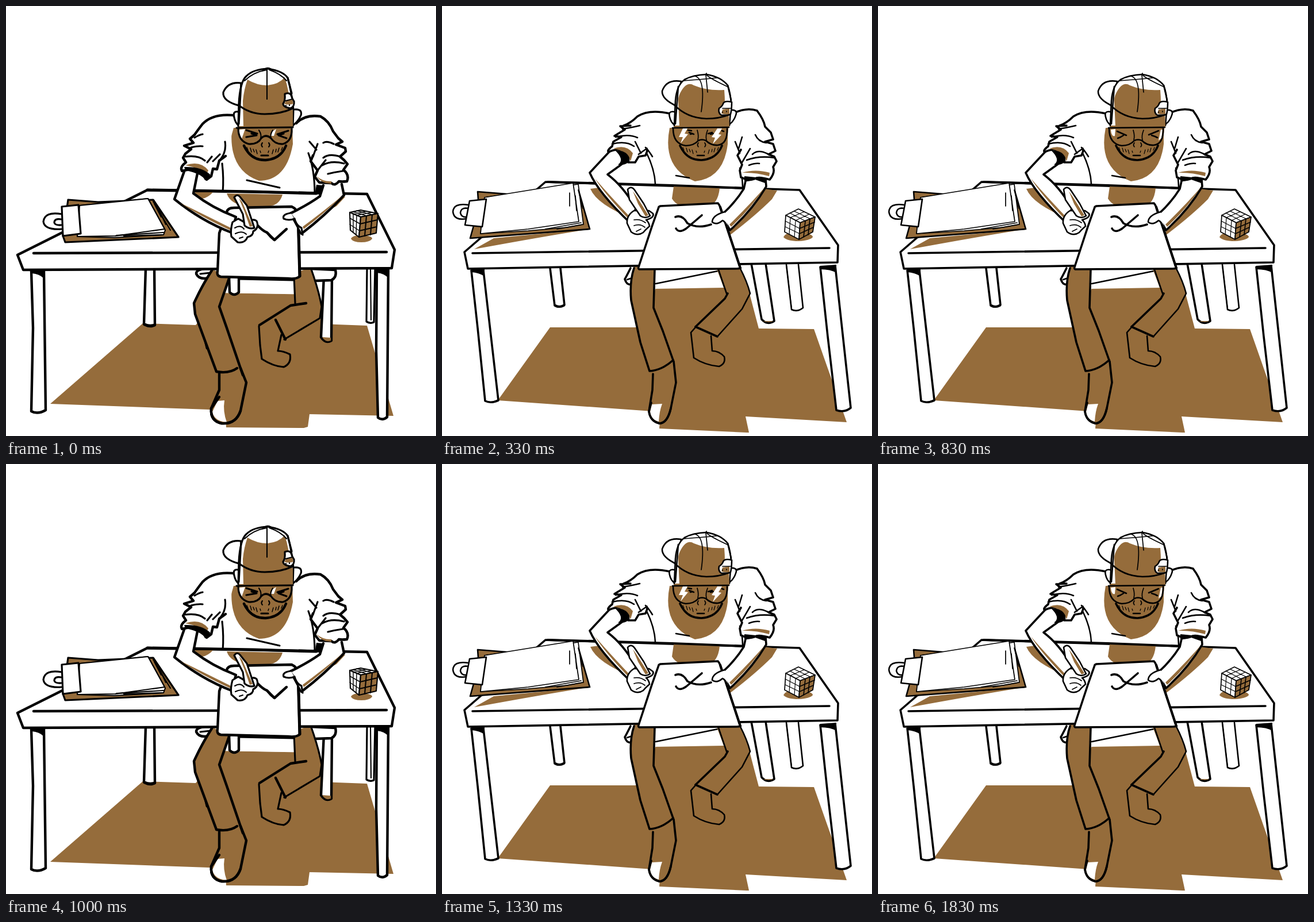
An HTML page that plays this animation: 748 by 748 pixels, repeating every 2010 ms.

```html
<!DOCTYPE html>
<html lang="en">
<head>
<meta charset="utf-8">
<title>Writing at the desk</title>
<style>
html, body { margin: 0; width: 100%; height: 100%; overflow: hidden; background: #fff; }
svg { display: block; width: 100%; height: 100%; --pen: 4.4px; stroke: #000; stroke-width: var(--pen); stroke-linecap: round; stroke-linejoin: round; }
path { fill: none; }
.w { fill: #fff; }
.b { fill: #956c3b; stroke: none; }
.o { fill: #956c3b; }
.e { fill: #fff; stroke: none; }
.k { fill: #000; stroke: none; }
.f { stroke-width: calc(var(--pen) * .33); }
.t { stroke-width: calc(var(--pen) * .48); }
.m { stroke-width: calc(var(--pen) * .72); }
.h { stroke-width: calc(var(--pen) * 1.15); }
.glare .squint, .shut .shine { display: none; }
</style>
</head>
<body>
<!-- d is the upright pose, data-to the leaning pose; both share one command structure -->
<svg id="scene" class="shut" viewBox="0 0 748 748">
<g id="floor">
<path class="b" d="M77 692L238 552L330 555L375 499L545 502L548 553L628 556L674 713L528 710L525 732L518 734L383 733L381 703Z" data-to="M97 686L188 559L340 559L372 491L532 489L551 561L647 562L704 724L528 714L534 742L530 742L378 735L380 706Z"/>
<path class="w" d="M243 456L240 553Q250 560 259 555L258 456" data-to="M188 456L196 521Q204 526 213 520L206 456"/>
<path class="h" d="M241 554Q250 558 258 555" data-to="M197 521Q204 525 212 521"/>
<path class="w m" d="M628 456L627 549Q634 553 640 550L642 456" data-to="M599 450L608 528Q618 533 628 525L620 450"/>
<path class="t" d="M634 456L635 546" data-to="M599 450L608 526"/>
</g>

<g id="chair">
<path class="e" d="M370 450L372 499L503 501L503 450Z" data-to="M366 450L368 492L490 490L478 450Z"/>
<path class="w" d="M345 457Q330 459 331 466Q336 477 354 473L358 464" data-to="M328 456Q320 472 318 475Q322 488 332 483L342 476"/>
<path class="m" d="M338 466L356 464" data-to="M322 476L334 472"/>
<path class="m" d="M405 475L500 477" data-to="M372 483L480 461"/>
<path class="w" d="M388 470L389 498Q397 506 405 498L405 474" data-to="M388 430L388 448Q396 452 404 446L404 430"/>
<path class="w" d="M553 470L548 576Q556 588 566 582L567 470" data-to="M538 448L556 545Q566 556 578 548L563 448"/>
<path class="b" d="M550 576L565 577L565 582Q556 586 550 576Z" data-to="M558 548L576 548L574 549Q566 551 558 548Z"/>
<path class="w" d="M530 457L573 459Q576 472 566 477L538 478" data-to="M530 440L540 442Q545 446 540 448L530 448"/>
<path class="h" d="M343 565L350 595" data-to="M345 565L350 590"/>
</g>

<g id="legs">
<path class="b" d="M358 458Q340 488 327 517L329 536L366 636Q388 640 408 630L384 560L371 523L388 470Z" data-to="M334 452Q326 480 329 512L345 585L361 635Q382 634 402 616L384 565L370 525L370 456Z"/>
<path class="o" d="M371 640L371 668L357 700Q355 722 375 726Q400 728 408 704L418 655L408 630" data-to="M367 640L366 668L360 705Q362 722 378 726Q392 726 398 700L407 655L403 618"/>
<path class="e" d="M368 687L380 686Q377 705 384 724Q362 722 359 706Z" data-to="M365 693L383 692Q378 705 377 723Q364 720 362 706Z"/>
<path d="M371 680L357 700Q355 722 375 726Q400 728 408 704" data-to="M364 690L360 705Q362 722 378 726Q392 726 398 700"/>
<path d="M358 460Q340 488 327 517L329 536L366 636Q388 640 402 630" data-to="M334 456Q326 480 329 512L345 585L361 635Q382 634 402 616"/>
<path d="M388 474L371 523L384 560L412 642" data-to="M370 458L368 525L384 565L402 616"/>
<path class="b" d="M500 465L503 519L443 553L484 581L546 543L549 522L530 455Z" data-to="M477 455L495 503L441 558L479 575L522 527L536 500L518 452Z"/>
<path class="o m" d="M440 557L442 590L445 614Q465 627 483 628Q497 622 494 606Q482 600 473 600L479 572" data-to="M440 560L433 568L438 612Q458 625 482 627Q494 622 491 610Q482 600 470 600L468 574"/>
<path class="m" d="M501 470L503 517" data-to="M480 456L495 500"/>
<path d="M522 517L495 521L441 555" data-to="M497 500L492 509L441 558"/>
<path d="M469 546L486 580" data-to="M441 558L479 575"/>
<path class="m" d="M530 455Q545 498 549 523L546 543L484 580" data-to="M518 455Q531 480 536 500L522 527L479 575"/>
</g>

<g id="torso">
<path class="m" d="M376 274Q379 300 377 324" data-to="M354 252Q370 283 371 310"/>
<path class="m" d="M526 256Q537 285 537 326" data-to="M518 282Q522 290 523 315"/>
<path class="b" d="M393 212Q386 285 440 304Q488 304 499 240L498 210Z" data-to="M396 212Q382 282 440 305Q490 300 497 240L497 210Z"/>
<path class="m" d="M419 303L476 316" data-to="M407 295Q430 299 448 312"/>
</g>

<g id="table">
<path class="w" d="M246 320L628 327L676 424L671 456L30 459L20 433Z" data-to="M180 306L622 320L689 416L688 446L45 457L39 428Z"/>
<path class="h" d="M246 320L430 323L540 326" data-to="M184 306L400 312L530 317"/>
<path d="M48 430L662 428" data-to="M53 430L674 421"/>
<path class="b" d="M384 326L481 328Q476 347 455 349L425 350Q390 346 384 326Z" data-to="M403 314L483 317Q480 345 462 349L440 352Q410 352 400 335Z"/>
<path class="b" d="M328 324L360 324Q352 333 342 335Q334 334 328 324Z" data-to="M258 318L288 314Q312 340 332 370Q270 346 258 318Z"/>
<path class="b" d="M590 332L575 348Q545 362 514 390L520 372L580 330Z" data-to="M583 321L574 336Q545 365 499 400L503 382L560 318Z"/>
<path class="w" d="M44 461L47 560L44 705Q55 711 69 703L66 461" data-to="M51 460L62 560L75 687Q85 692 98 686L72 460"/>
<path class="k" d="M45 459L68 459L66 474Q58 466 45 465Z" data-to="M51 457L74 457L74 470Q64 464 51 463Z"/>
<path class="w" d="M645 457L644 600L647 716Q655 722 663 715L665 457" data-to="M658 454L671 575L686 703Q700 708 711 699L684 452"/>
<path class="k" d="M645 457L667 456L666 474Q658 465 645 464Z" data-to="M658 452L686 450L686 464Q676 458 658 458Z"/>
</g>

<g id="clipboard">
<path class="b" d="M108 408L290 402L240 404Q150 404 108 408Z" data-to="M56 423L90 404L257 388Q170 402 56 423Z"/>
<path class="o m" d="M108 337L160 341L256 337L300 402L103 411L99 400Z" data-to="M62 323L125 328L238 322L257 388L49 404L64 350Z"/>
<path class="w t" d="M128 347L247 335L277 390L274 398L188 403L124 401Z" data-to="M74 333L237 310L246 380L218 385L150 391L67 396Z"/>
<path class="w t" d="M128 347L247 335L276 388L190 400L124 401Z" data-to="M74 333L228 308L238 375L150 388L67 396Z"/>
<path class="t" d="M192 399L274 394M205 400L272 398M256 340L286 390" data-to="M180 388L242 377M200 388L244 380M237 320L245 352"/>
<path class="t" d="M258 344L270 367M266 355L278 380" data-to="M222 325Q222 348 234 356M232 330L240 352"/>
<path class="w m" d="M97 362Q67 357 65 375Q67 390 97 388" data-to="M46 346Q20 342 19 358Q21 374 43 370"/>
<path class="m" d="M96 371Q84 369 84 377Q86 382 96 381" data-to="M45 352Q33 350 32 360Q34 368 42 367"/>
<path class="w m" d="M97 349L126 346L130 396L99 400Z" data-to="M48 339L77 336L70 384L40 381Z"/>
</g>

<g id="cube" class="t">
<path class="b" d="M600 405Q602 398 622 399Q637 400 637 405Q632 411 618 411Q604 411 600 405Z" data-to="M594 402Q598 392 622 394Q645 396 645 402Q640 408 620 409Q600 409 594 402Z"/>
<path class="w" d="M598 359L617 355L647 361L617 367Z" data-to="M598 364L620 353L649 367L623 377Z"/>
<path class="w" d="M598 359L617 367L614 402L599 390Z" data-to="M598 364L623 377L621 406L596 393Z"/>
<path class="o" d="M617 367L647 361L644 395L614 402Z" data-to="M623 377L649 367L645 393L621 406Z"/>
<path class="f" d="M604 358L627 365M610 356L637 363M604 362L627 357M610 364L637 359" data-to="M605 360L632 374M613 357L640 370M606 368L630 358M615 373L639 362"/>
<path class="f" d="M604 362L604 394M610 364L609 398M598 369L616 379M598 380L615 391" data-to="M606 368L604 397M615 373L613 402M597 374L622 387M597 384L622 396"/>
<path d="M627 365L624 400M637 363L634 398M616 379L646 372M615 391L645 384" data-to="M632 374L629 402M640 370L637 398M622 387L648 376M622 396L646 385"/>
</g>

<g id="sheet">
<path class="w" d="M384 359Q385 351 397 351L497 349Q506 353 508 363L511 470Q505 476 490 474L374 471Q366 470 368 461L371 395Z" data-to="M377 350Q377 349 380 348L480 343Q482 345 484 350L519 456Q517 457 510 457L343 458Q341 457 342 454L365 384Z"/>
<path class="h" d="M508 363L511 470" data-to="M484 350L519 456"/>
<path d="M436 380Q446 391 454 394Q462 402 467 407" data-to="M406 367Q418 362 427 378Q445 388 468 380"/>
<path d="M488 388L467 407Q460 402 454 394" data-to="M452 364L425 387Q412 396 407 387"/>
</g>

<g id="arms">
<path class="w" d="M312 282L293 336Q340 374 392 394L400 367Q358 351 326 326L334 286" data-to="M298 246L257 290Q272 325 328 378L337 352Q316 314 288 293L320 270"/>
<path class="b" d="M304 343Q338 366 390 390L391 386Q345 363 304 343Z" data-to="M266 300Q282 326 328 374L330 370Q290 328 266 300Z"/>
<path class="w" d="M584 310L588 329Q555 365 514 396L500 370L494 361Q525 346 546 331L552 312" data-to="M563 302L564 314Q540 355 501 390L492 374L488 362Q510 342 525 318L529 300"/>
<path class="b" d="M585 330Q555 360 518 388L516 384Q550 359 585 330Z" data-to="M561 316Q538 352 503 384L500 380Q535 346 561 316Z"/>
<path class="w m" d="M496 360Q480 362 483 370Q492 374 502 370Q505 382 514 386L516 398" data-to="M492 358Q470 364 470 376Q478 382 488 373Q494 376 497 386L501 400"/>
<path class="w m" d="M394 376Q390 390 392 401L403 411Q416 413 420 402Q430 400 430 392Q441 386 436 374Q428 368 420 379L404 370Z" data-to="M334 356Q321 364 322 378L329 393Q340 401 350 394Q354 389 361 383Q360 376 355 372Q370 368 367 361Q360 356 350 363Z"/>
<path class="w m" d="M397 333Q402 326 407 332L419 347L432 386Q424 389 415 382L412 362Z" data-to="M323 319Q329 312 335 320L351 344L362 365Q354 371 345 365L326 337Z"/>
<path class="b" d="M405 334L411 341L429 383L424 384L415 358Z" data-to="M332 322L339 332L359 364L354 366L341 344Z"/>
<path class="t" d="M398 386Q408 380 414 388M399 396Q410 390 418 397M406 404L412 402" data-to="M334 372Q345 370 354 377M334 382Q345 378 353 385M338 392L346 388"/>
</g>

<g id="sleeves">
<path class="w" d="M402 191Q362 185 342 205Q332 218 328 224L320 231L326 238L310 243L322 249L312 257L308 264L313 272Q302 280 306 287Q325 281 344 288Q348 296 349 302L357 296L360 283L367 284L371 269L382 261" data-to="M396 187Q360 179 340 192Q328 204 316 208L328 208L310 209L318 215L300 226L312 228L298 236L296 244Q286 252 290 254Q306 246 320 254Q326 264 324 272L336 272L342 262L354 260L357 252L356 248"/>
<path class="b" d="M312 277Q338 268 352 286L348 294Q335 281 312 277Z" data-to="M298 248Q320 240 332 256L328 270Q322 252 298 248Z"/>
<path class="k" d="M310 280Q340 279 355 293Q355 302 346 303Q342 292 312 286Z" data-to="M302 252Q320 250 326 264Q326 278 306 276Q318 268 302 252Z"/>
<path class="m" d="M328 229Q336 224 342 223M322 246Q335 243 342 244M312 262Q335 259 346 269M350 272L358 262M360 270L372 258" data-to="M314 214Q332 211 344 208M302 228Q325 222 340 229M296 240Q320 234 334 244M336 236L346 256M342 258L356 248"/>
<path class="m" d="M371 269Q384 255 381 236" data-to="M366 262Q360 252 354 246"/>
<path class="w" d="M505 204Q520 188 547 192Q562 200 569 218L578 230L585 236L574 241L590 247L591 253L581 262L588 268L594 275L587 285Q598 294 593 305Q584 306 579 305Q572 314 566 308L545 307L537 297L542 286L530 270L534 260" data-to="M508 186Q530 176 548 182Q560 198 562 210L572 220L576 232L562 236L576 240L580 252L568 258L578 262L582 270L576 280Q580 290 570 302Q550 296 545 300Q535 304 530 302L520 298L518 286L522 276L514 260L520 250"/>
<path class="b" d="M540 296Q552 306 566 305L566 309Q550 310 540 296Z" data-to="M522 290Q545 283 570 290L569 296Q545 289 522 290Z"/>
<path class="k" d="M540 311L552 312L552 318L546 329L538 323Z" data-to="M526 296L566 300L562 308L545 302L526 306Z"/>
<path class="m" d="M570 240Q558 234 552 238M582 262Q562 256 552 264M588 274Q566 268 550 277M560 292Q572 289 586 287M534 262L542 240M542 286L556 268M528 236L540 250" data-to="M564 238Q550 236 545 224M568 258Q550 248 540 258M578 264Q552 260 530 268M534 277Q545 273 552 274M516 248L522 228M522 272L536 248M510 236L518 256"/>
</g>

<g id="head">
<path class="w m" d="M404 184Q394 182 397 194Q399 204 405 208" data-to="M404 184Q393 182 396 193Q398 203 405 207"/>
<path class="w m" d="M502 180Q516 179 513 190Q509 200 500 207" data-to="M502 181Q515 180 511 190Q508 200 500 206"/>
<path class="b" d="M403 206L404 230Q418 268 452 268Q486 266 496 232L499 206Z"/>
<path class="w m" d="M409 134Q386 131 378 150Q376 166 408 174Z" data-to="M416 131Q390 127 383 148Q382 162 408 174Z"/>
<path class="w m" d="M404 209L405 170Q407 132 418 122Q430 110 455 109Q482 113 490 125Q497 150 500 180L499 209" data-to="M404 208L406 165Q408 138 422 128Q436 120 460 119Q485 123 497 138Q502 152 503 170L500 208"/>
<path class="b" d="M420 128Q436 138 455 138Q475 136 485 124Q493 150 495 178L499 182L499 210L413 210L412 165Q414 145 420 128Z" data-to="M414 152Q425 130 438 138Q462 148 491 146Q492 158 492 168L499 190L500 210L413 210L411 168Q410 160 414 152Z"/>
<path class="m" d="M404 172Q424 188 450 188Q478 188 499 178" data-to="M404 172Q426 195 460 196Q482 196 500 189"/>
<path class="t" d="M454 110L454 162M454 111Q430 115 415 130M458 111Q478 118 488 130M446 113Q455 103 464 112" data-to="M459 120Q462 150 451 184M459 127Q440 122 420 130M459 127Q478 125 496 140M455 121Q460 117 466 121"/>
<path class="m" d="M409 135L405 205M490 125L497 152" data-to="M411 140L406 205M497 138L503 164"/>
<path class="w m" d="M485 153Q495 149 497 158Q498 162 501 166Q502 175 495 178Q482 176 482 170Q486 165 485 153Z" data-to="M504 167Q491 164 489 170Q488 174 482 178Q480 186 486 190Q500 190 502 188Q504 180 504 167Z"/>
<path class="b" d="M487 165L498 163L500 170Q490 173 484 170Z" data-to="M488 180L500 178L500 188Q492 189 486 187Z"/>
<path class="t" d="M486 165L498 162M487 173L487 174M493 172L493 173" data-to="M488 178L502 178M488 184L488 185M495 183L495 184"/>

<path d="M414 243Q426 269 452 268Q478 266 487 243"/>
<path class="f" d="M419 246L421 251M425 247L427 254M430 249L432 254M435 250L437 257M465 250L463 257M470 249L469 254M475 247L473 254M481 246L479 251M442 252L443 255M457 252L456 255"/>
<path class="t" d="M446 238Q443 242 446 245M457 238Q460 242 457 245"/>
<path class="m" d="M444 260L456 260"/>

<g class="squint">
<path class="e" d="M406 215L416 214L410 231Q405 225 406 215Z" data-to="M405 215L413 214L412 226Q406 228 405 215Z"/>
<path class="e" d="M462 219L470 214L466 226L461 226Z" data-to="M492 215L495 215L493 230L488 234Z"/>
<path class="m" d="M418 216L437 222M418 228L436 225L427 222" data-to="M416 218L432 225L417 230M422 228L427 225"/>
<path class="m" d="M491 217L472 223M488 230L474 225L483 222" data-to="M488 217L471 224L486 229M482 227L476 225"/>
</g>
<g class="shine">
<path class="m" d="M415 218L422 221M438 218L442 222M419 231L424 230" data-to="M430 220L438 223M428 216L434 217M432 223L436 222"/>
<path class="m" d="M466 222L474 220M490 218L494 216M470 230L475 228" data-to="M463 222L470 220M487 217L490 218M467 223L472 222"/>
<path class="e" d="M428 213L438 213L432 223L436 225L423 241L427 230L420 229Z" data-to="M419 213L427 213L422 222L428 223L415 239L419 228L412 228Z"/>
<path class="e" d="M482 212L491 212L486 223L490 225L475 241L479 230L473 229Z" data-to="M479 213L487 213L481 223L486 224L471 240L475 229L469 228Z"/>
</g>
<path class="m" d="M401 212L499 211M404 213Q404 235 422 240Q438 241 444 230Q452 222 461 230Q468 241 482 240Q498 235 497 213" data-to="M401 212L499 211M402 213Q402 240 424 243Q438 243 446 234Q452 231 459 234Q468 243 480 242Q497 240 496 213"/>
<path class="t" d="M440 216Q445 224 443 230M464 216Q459 224 461 230" data-to="M444 216Q447 226 445 233M462 216Q458 226 460 233"/>
</g>
</svg>
<script>
const scene = document.getElementById("scene");
const movers = [...scene.querySelectorAll("[data-to]")].map(el => ({
  el,
  from: el.getAttribute("d"),
  to: el.dataset.to.match(/\d+/g).map(Number)
}));
const LOOP = 2010, LEAN = [0, 0.35, 1];
const starts = Array.from({ length: 12 }, (_, k) => Math.round(k * 50 / 3) * 10);
let shown = -1;

function pose(p) {
  for (const { el, from, to } of movers) {
    let i = 0;
    el.setAttribute("d", from.replace(/\d+/g, n => +(+n + (to[i++] - n) * p).toFixed(1)));
  }
  scene.style.setProperty("--pen", `${4.4 - p * 0.8}px`);
}

function show(step) {
  pose(LEAN[step % 3]);
  const beat = step % 6;
  scene.setAttribute("class", beat > 1 && beat < 5 ? "glare" : "shut");
}

const begin = performance.now();
function tick(now) {
  const t = Math.max(0, now - begin) % LOOP;
  const step = starts.filter(s => s <= t).length - 1;
  if (step !== shown) show(shown = step);
  requestAnimationFrame(tick);
}
show(shown = 0);
requestAnimationFrame(tick);
</script>
</body>
</html>
```
